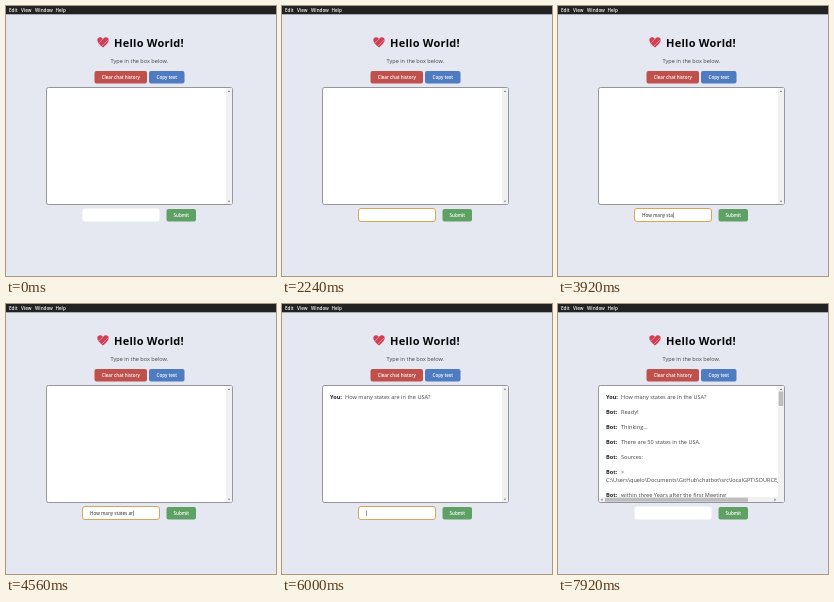
An HTML page that plays this animation: 270 by 270 pixels, repeating every 8 s.

```html
<!DOCTYPE html>
<html lang="en">
<head>
<meta charset="utf-8">
<title>Chat window</title>
<style>
  html, body { margin: 0; width: 100%; height: 100%; overflow: hidden; background: #e5e8f1; }
  svg { display: block; width: 100%; height: 100%; font-family: "Open Sans", "Noto Sans", sans-serif; }
  text { white-space: pre; fill: #444; }
  .menu { font-size: 4.6px; font-weight: 600; fill: #f4f4f4; }
  .title { font-size: 11px; font-weight: 700; letter-spacing: .25px; fill: #050505; }
  .button { font-size: 4.5px; font-weight: 600; fill: #fff; text-anchor: middle; }
  .chat { font-size: 5.6px; }
  .speaker { font-weight: 700; fill: #222; }
  .typed { font-size: 4.68px; fill: #222; }
</style>
</head>
<body>
<svg viewBox="0 0 270 270">
  <defs>
    <clipPath id="chatClip"><rect x="41" y="82" width="179" height="111"/></clipPath>
    <clipPath id="heartClip"><path id="heart" d="M97 41.5C93.5 38.500 91.300 36.500 91.300 34C91.300 30.600 95.500 30.200 97 33C98.500 30.200 102.700 30.600 102.700 34C102.700 36.500 100.500 38.500 97 41.500Z"/></clipPath>
  </defs>

  <rect width="270" height="270" fill="#e5e8f1"/>
  <rect width="270" height="8.300" fill="#222"/>
  <text class="menu" x="3" y="6">Edit</text>
  <text class="menu" x="15" y="6">View</text>
  <text class="menu" x="29" y="6">Window</text>
  <text class="menu" x="49.500" y="6">Help</text>

  <use href="#heart" fill="#cf4055"/>
  <path d="M92 38L100 30M95 41L103 33" clip-path="url(#heartClip)" stroke="#e9a0ac" stroke-width=".7"/>
  <text class="title" x="108" y="40.500">Hello World!</text>
  <text x="133.300" y="57.300" font-size="5.55" text-anchor="middle">Type in the box below.</text>

  <rect x="88.500" y="65" width="52.500" height="12.500" rx="2" fill="#bf504b"/>
  <text class="button" x="114.800" y="73">Clear chat history</text>
  <rect x="143" y="65" width="35.500" height="12.500" rx="2" fill="#4f7cc0"/>
  <text class="button" x="160.800" y="73">Copy text</text>

  <rect x="40.500" y="81.500" width="186" height="117" rx="2" fill="#fff" stroke="#7d7f85" stroke-width=".8"/>
  <rect x="220" y="82.200" width="6" height="115.800" fill="#f1f1f1"/>
  <path d="M221.800 86L223 84.500L224.200 86ZM221.800 194.800L223 196.300L224.200 194.800Z" fill="#777"/>
  <g id="log" clip-path="url(#chatClip)"></g>
  <g id="scroll">
    <rect x="220.700" y="87.500" width="4.600" height="14.500" fill="#bdbdbd"/>
    <rect x="41.200" y="193" width="184.500" height="5" fill="#f1f1f1"/>
    <rect x="47" y="193.700" width="143" height="4" fill="#bdbdbd"/>
    <path d="M44.500 194.500L43 195.700L44.500 196.900ZM216.500 194.500L218 195.700L216.500 196.900Z" fill="#666"/>
  </g>

  <rect id="field" x="76.500" y="202.500" width="77" height="13" rx="2.500" fill="#fff"/>
  <text id="typed" class="typed" x="84" y="211"></text>
  <rect id="caret" y="206.500" width=".5" height="5.500" fill="#333"/>
  <rect x="160.500" y="203" width="29.500" height="12.500" rx="2" fill="#5fa065"/>
  <text class="button" x="175.300" y="211">Submit</text>

  <g id="pointer">
    <path id="arrow" d="M0 0V7.500L1.800 5.900L3 8.500L4.100 8L3 5.500H5.300Z" fill="#fff" stroke="#222" stroke-width=".5"/>
    <path id="beam" d="M-1.300 -3Q0 -3 0 -2Q0 -3 1.300 -3M0 -2V2M-1.300 3Q0 3 0 2Q0 3 1.300 3" fill="none" stroke="#333" stroke-width=".7"/>
  </g>
</svg>
<script>
const LOOP = 8000, FOCUS = 1500, TYPE = 2720, KEY = 100, SUBMIT = 6000, BLUR = 7200;
const QUESTION = "How many states are in the USA?";
const PATH = "C:\\Users\\quelo\\Documents\\GitHub\\chatbot\\src\\localGPT\\SOURCE_DOCUMENTS";
// speaker, message, baseline, time of appearance
const MESSAGES = [
  ["You:", QUESTION, 95, SUBMIT],
  ["Bot:", "Ready!", 110, 7200],
  ["Bot:", "Thinking...", 125, 7200],
  ["Bot:", "There are 50 states in the USA.", 140, 7440],
  ["Bot:", "Sources:", 155, 7440],
  ["Bot:", ">", 170, 7440],
  ["", PATH, 177.7, 7440],
  ["Bot:", "within three Years after the first Meeting", 192.5, 7440]
];
const $ = id => document.getElementById(id);
const show = (node, on) => node.setAttribute("visibility", on ? "visible" : "hidden");

function addText(parent, className, x, y, content) {
  const node = document.createElementNS("http://www.w3.org/2000/svg", "text");
  node.setAttribute("class", className);
  node.setAttribute("x", x);
  node.setAttribute("y", y);
  node.textContent = content;
  parent.append(node);
}

const rows = MESSAGES.map(([speaker, message, y, start]) => {
  const group = document.createElementNS("http://www.w3.org/2000/svg", "g");
  addText(group, "chat speaker", 48, y, speaker);
  addText(group, "chat", speaker ? 63 : 48, y, message);
  $("log").append(group);
  return { group, start };
});

function drawPointer(t) {
  const p = Math.min(1, Math.max(0, (t - 800) / 300));
  const eased = 1 - (1 - p) ** 2;
  const x = 250 - 130 * eased, y = 217 - 3 * eased;
  const inField = x < 153;
  const visible = t >= 800 && t < 1900;
  $("pointer").setAttribute("transform", `translate(${x} ${y})`);
  show($("arrow"), visible && !inField);
  show($("beam"), visible && inField);
}

function draw(t) {
  const focused = t >= FOCUS && t < BLUR;
  const count = t < SUBMIT ? Math.max(0, Math.floor((t - TYPE) / KEY)) : 0;
  $("typed").textContent = QUESTION.slice(0, count);
  $("field").setAttribute("stroke", focused ? "#d9a656" : "none");

  const typing = t >= TYPE && t < TYPE + KEY * QUESTION.length;
  const blinkStart = t < TYPE ? FOCUS : SUBMIT;
  const blinkOn = Math.floor((t - blinkStart) / 500) % 2 === 0;
  $("caret").setAttribute("x", 84.2 + (count ? $("typed").getComputedTextLength() : 0));
  show($("caret"), focused && (typing || blinkOn));

  for (const { group, start } of rows) show(group, t >= start);
  show($("scroll"), t >= 7440);
  drawPointer(t);
}

const began = performance.now();
function frame() {
  draw((performance.now() - began) % LOOP);
  requestAnimationFrame(frame);
}
frame();
</script>
</body>
</html>
```
